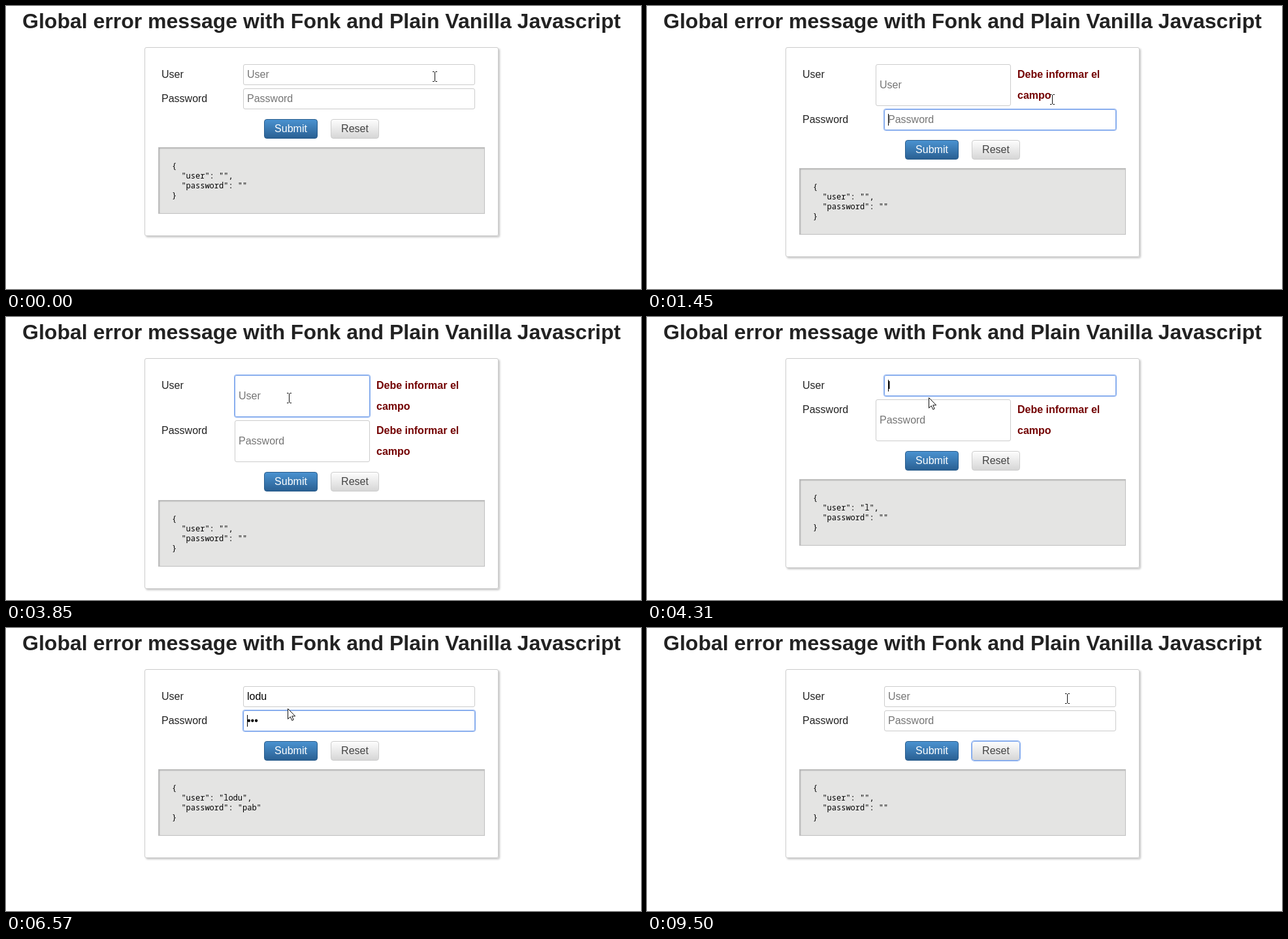
Recreate the animation shown at these times as an HTML page. Size 972 px wide and 433 px high, loop 9.82 s.

```html
<!DOCTYPE html>
<html lang="en">
<head>
<meta charset="utf-8">
<title>Form validation</title>
<style>
  html, body { margin: 0; width: 100%; height: 100%; overflow: hidden; background: #fff; }
  body { position: relative; font: 16px/32px "Liberation Sans", Arial, sans-serif; color: #222; cursor: default; }
  h1 { position: absolute; left: -3px; top: 0; width: 972px; margin: 0; font-size: 32px; line-height: 46px; text-align: center; white-space: nowrap; }
  .card { position: absolute; left: 212px; top: 63px; width: 540px; padding: 25px 0 33px; border: 1px solid #ccc; border-radius: 3px; box-shadow: 2px 2px 3px rgba(0, 0, 0, .22); }
  .row { position: relative; height: 32px; margin-bottom: 5px; }
  .row label { position: absolute; left: 25px; }
  .field { position: absolute; box-sizing: border-box; left: 150px; width: 355px; height: 100%; padding-left: 5px; border: 1px solid #ccc; border-radius: 3px; display: flex; align-items: center; color: #000; white-space: pre; }
  .field.empty { color: #757575; }
  .caret { position: absolute; width: 1px; height: 18px; background: #000; }
  .error { display: none; position: absolute; left: 354px; width: 150px; font-weight: bold; color: #730000; }
  .bad { height: 64px; }
  .bad .field { left: 137px; width: 207px; }
  .bad .error { display: block; }
  .focus { border-color: #82a9ec !important; box-shadow: 0 0 0 1px #8fb3f0; }
  .buttons { position: relative; height: 30px; margin-top: 15px; }
  .button { position: absolute; box-sizing: border-box; height: 30px; line-height: 28px; text-align: center; border: 1px solid; border-radius: 4px; }
  .submit { left: 182px; width: 82px; color: #fff; border-color: #285c8c; background: linear-gradient(#4a92d0, #2a6093); }
  .reset { left: 284px; width: 74px; color: #444; border-color: #ccc; background: linear-gradient(#fdfdfd, #d6d6d6); }
  pre { box-sizing: border-box; width: 500px; height: 102px; margin: 13px 0 0 20px; padding: 20px; border: 1px solid #c2c2c2; background: #e4e4e3; box-shadow: inset 1px 1px 2px #aaa; color: #000; font: 12px/15px "Noto Sans Mono", "DejaVu Sans Mono", monospace; }
  #cursor { position: absolute; left: 0; top: 0; width: 20px; height: 30px; overflow: visible; pointer-events: none; }
</style>
</head>
<body>
<h1>Global error message with Fonk and Plain Vanilla Javascript</h1>
<div class="card">
  <div class="row" id="user"><label>User</label><div class="field"></div><div class="error">Debe informar el campo</div></div>
  <div class="row" id="password"><label>Password</label><div class="field"></div><div class="error">Debe informar el campo</div></div>
  <div class="buttons"><div class="button submit">Submit</div><div class="button reset">Reset</div></div>
  <pre></pre>
</div>
<svg id="cursor">
  <path id="arrow" d="M.5 .5V16.3L4.2 12.8 6.8 18.5 9.2 17.4 6.7 11.9H11.7Z" fill="#fff" stroke="#111"/>
  <path id="beam" d="M-1 -6.5H1.5M3.5 -6.5H6M2.5 -6V8M-1 8.5H1.5M3.5 8.5H6" fill="none" stroke="#111"/>
</svg>
<script>
const LOOP = 9820, BLINK = 530;
const NAME = 'lodu', PASS = 'pab';

// time, name letters, password letters, focus, bad name, bad password, caret delay
const STATES = [
  [0, 0, 0, '', 0, 0],
  [530, 0, 0, 'user', 0, 0],
  [1450, 0, 0, 'password', 1, 0],
  [2300, 0, 0, '', 1, 1],
  [3370, 0, 0, 'user', 1, 1, -50],
  [4310, 1, 0, 'user', 0, 1],
  [4610, 2, 0, 'user', 0, 1],
  [4920, 3, 0, 'user', 0, 1],
  [5240, 4, 0, 'user', 0, 1],
  [5470, 4, 0, 'password', 0, 1, 20],
  [6020, 4, 1, 'password', 0, 0],
  [6250, 4, 2, 'password', 0, 0],
  [6570, 4, 3, 'password', 0, 0],
  [8580, 4, 3, 'reset', 0, 0],
  [8730, 0, 0, 'reset', 0, 0],
];

// first step, last step, step count, pointer path
const MOVES = [
  [760, 1070, 5, [[654, 107], [618, 142]]],
  [1680, 2070, 6, [[618, 142], [612, 240]]],
  [2530, 3220, 10, [[612, 240], [624, 290], [590, 200], [480, 96], [431, 123]]],
  [7180, 7720, 8, [[431, 123], [462, 185], [508, 217], [533, 186]]],
  [8810, 9270, 7, [[533, 186], [600, 140], [648, 107]]],
  [9420, 9500, 2, [[648, 107], [641, 107]]],
];

const $ = s => document.querySelector(s);
const reset = $('.reset'), json = $('pre'), cursor = $('#cursor');
const arrow = $('#arrow'), beam = $('#beam');

function along(path, p) {
  const s = p * (path.length - 1), i = Math.min(Math.floor(s), path.length - 2);
  return path[i].map((v, k) => Math.round(v + (path[i + 1][k] - v) * (s - i)));
}

function pointerAt(t) {
  const move = MOVES.filter(m => m[0] <= t).pop();
  if (!move) return MOVES[0][3][0];
  const [from, to, n, path] = move;
  const step = Math.min(n, 1 + Math.floor((t - from) / (to - from) * (n - 1) + 1e-6));
  const p = step / n;
  return along(path, p * p * (3 - 2 * p));
}

function drawField(id, text, hint, bad, focused, caretOn) {
  const row = $('#' + id), field = row.querySelector('.field');
  row.classList.toggle('bad', !!bad);
  field.classList.toggle('focus', focused);
  field.classList.toggle('empty', !text);
  const caret = caretOn ? '<i class="caret"></i>' : '';
  field.innerHTML = text ? `<span>${text}</span>${caret}` : `${caret}<span>${hint}</span>`;
}

let shown = '';
function drawForm(t) {
  const [start, nName, nPass, focus, badName, badPass, delay = 0] = STATES.filter(s => s[0] <= t).pop();
  const on = Math.floor((t - start - delay) / BLINK) % 2 === 0 || t < start + delay;
  const key = start + ':' + on;
  if (key === shown) return;
  shown = key;
  const name = NAME.slice(0, nName), pass = PASS.slice(0, nPass);
  drawField('user', name, 'User', badName, focus === 'user', focus === 'user' && on);
  drawField('password', '•'.repeat(nPass), 'Password', badPass, focus === 'password', focus === 'password' && on);
  reset.classList.toggle('focus', focus === 'reset');
  json.textContent = JSON.stringify({ user: name, password: pass }, null, 2);
}

function drawCursor(t) {
  const [x, y] = pointerAt(t);
  const under = document.elementFromPoint(x, y);
  const overText = !!(under && under.closest('.field, .error'));
  cursor.style.transform = `translate(${x}px, ${y}px)`;
  beam.style.display = overText ? '' : 'none';
  arrow.style.display = overText ? 'none' : '';
}

const begin = performance.now();
function frame() {
  const t = (performance.now() - begin) % LOOP;
  drawForm(t);
  drawCursor(t);
  requestAnimationFrame(frame);
}
frame();
</script>
</body>
</html>
```
